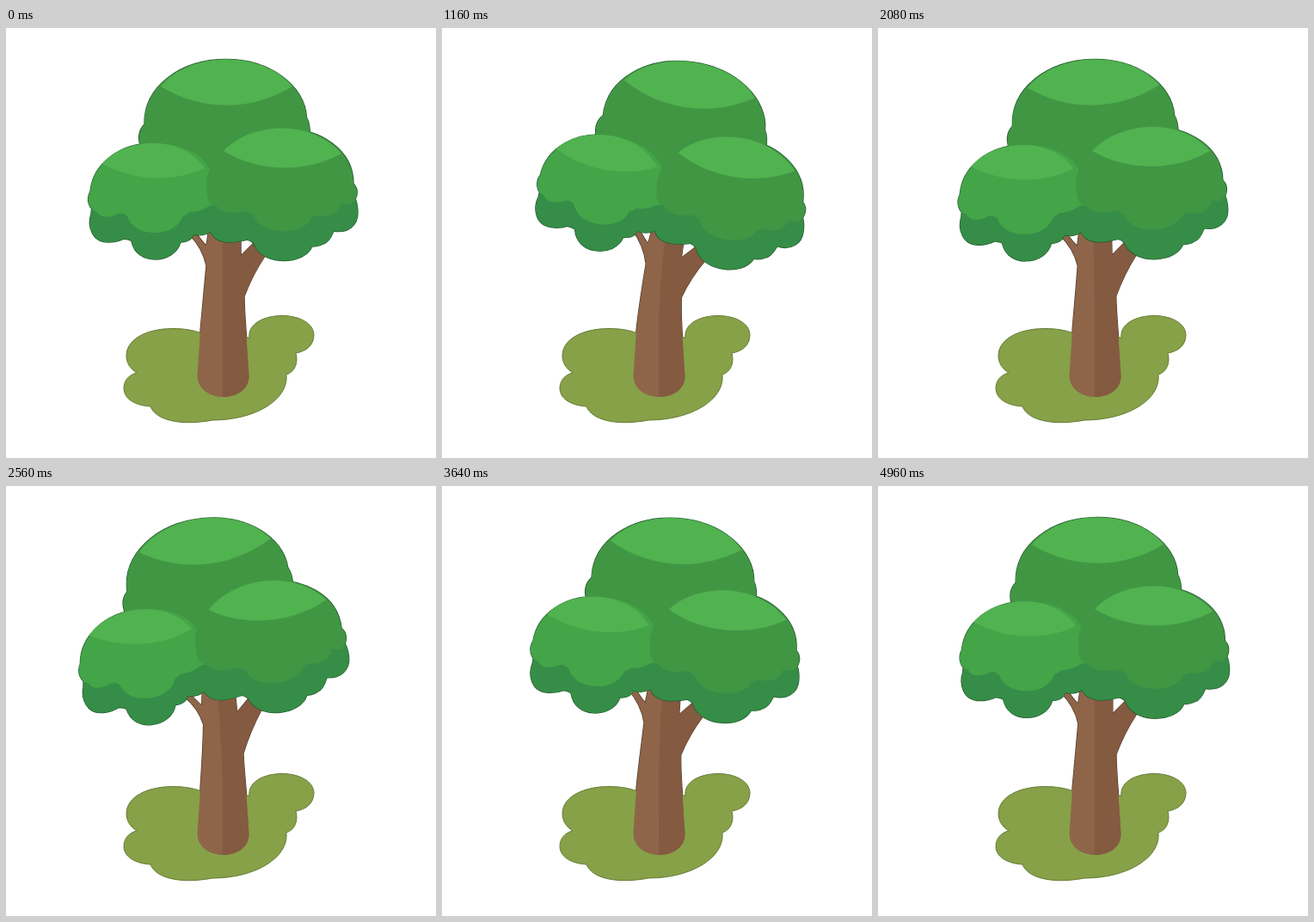
Write an HTML page that moves like this. It is 500 px wide and 500 px high and loops after 5000 ms.

```html
<!DOCTYPE html>
<html lang="en">
<head>
<meta charset="utf-8">
<title>Swaying tree</title>
<style>
  html, body { margin: 0; width: 100%; height: 100%; overflow: hidden; background: #fff; }
  svg { display: block; width: 100vw; height: 100vh; }
</style>
</head>
<body>
<svg viewBox="0 0 500 500">
  <g id="rim"></g>
  <path fill="#86a148" stroke="#667b35" stroke-width="1" d="M227,355 C218,351 206,349.500 194,349.500 C163,349.500 140,362 140,381 C140,389 144,396 152,401
    C143,403 137,410 137,419 C137,431 150,439 168,440 C174,456 203,463 240,456 C290,456 329,432 326,403
    C336,400 340,389 337,378 C349,376 358,369 358,357 C358,344 342,334.500 321,334.500 C300,334.500 281,344 283,360 Z"/>
  <g id="trunk"></g>
  <g id="crown" stroke-linejoin="round"></g>
</svg>
<script>
const LOOP = 5000, STEP = 40;
const rim = document.getElementById('rim');
const trunk = document.getElementById('trunk');
const crown = document.getElementById('crown');

// [time, lean]: the lean runs straight from knot to knot
const knots = [[0, 0], [920, 1.37], [2950, -1.36], [3950, 1.37], [5000, -0.09]];

const trunkRight = `C270,429 282.500,419 282.500,405
  L279,352 C278,338 277,325 277,312 C283,296 291,280 301,265 L301,245 L291,247
  L273,265 L273,222 Z`;
const trunkShape = `M235,222 L235,239 L233,253 C229,250 226,245 222,240 L213,240 C223,250 230,262 233,276
  C231,300 228,328 226,352 L222.500,404 C222.500,419 236,429 253,429 ${trunkRight}`;
const trunkShade = `M252,222 L252,265 C252,285 252,310 252,340 L252,429 ${trunkRight}`;

const dome = `M158,142 C153,130 154,119 161,112 C160,68 203,36.500 256,36.500
  C308,36.500 348,68 349.500,104 C352,108 353.500,115 353.500,125 L330,190 L180,190 Z`;
const skirt = `M100,205 L99,216 C95,228 98,249 119,249 C128,249 133,247 137,245 C142,246 145,246 146,248
  C149,262 160,269 173,269 C187,269 199,262 203,249 C213,249 217,244 218,240 C226,242 233,240 238,237
  C241,245 249,249 260,249 C270,249 277,247 281,246 C287,248 289,251 290,255
  C296,265 309,270.500 323,270.500 C338,270.500 351,265 356,254 C361,254 366,253 369,251
  C376,249 379,241 381,236 C398,239 409,229 409,215 C409,208 408,203 406,198 L330,170 L170,170 Z`;
const left = `M98,190 C101,158 132,134 171,134 C207,134 237,149 240,175 L250,206 C243,205 240,206 236,207
  C229,212 221,214 213,214 C210,217 208,218 206,218 C202,231 188,238 173,238 C157,238 145,231 141,219
  C136,214 132,215 128,217 C119,221 109,221 105,213 C96,211 93,199 98,190 Z`;
const right = `M238,162 C246,135 280,116.500 321,116.500 C366,116.500 404,142 404,181
  C411,188 409,200 400,205 C396,204 393,204 390,204 C388,214 379,220 367,218 C362,217 358,219 355,221
  C351,231 337,236 322,236 C306,236 293,230 288,218 C284,214 281,214 277,213
  C266,217 249,215 245,207 C236,206 233,196 234,188 C232,180 234,170 238,162 Z`;
const shines = `M180,68 C196,48 225,36.500 256,36.500 C288,36.500 317,48 333,68 C286,97 227,97 180,68 Z
  M112,158 C124,143 146,134 171,134 C197,134 219,145 231,163 C193,180 150,178 112,158 Z
  M253,143 C268,127 293,116.500 321,116.500 C349,116.500 374,128 390,146 C347,170 292,167 253,143 Z`;

function add(parent, d, attrs) {
  const p = document.createElementNS('http://www.w3.org/2000/svg', 'path');
  p.setAttribute('d', d);
  for (const k in attrs) p.setAttribute(k, attrs[k]);
  parent.appendChild(p);
  return p;
}

// The trunk's rim lies below the grass, so it shows only above it
const wood = [
  [rim, trunkShape, { fill: 'none', stroke: '#4d3426', 'stroke-width': 1.4 }],
  [trunk, trunkShape, { fill: '#8e6548' }],
  [trunk, trunkShade, { fill: '#845a41' }]
].map(([parent, d, attrs]) => ({ d, el: add(parent, d, attrs) }));

add(crown, dome + skirt + left + right, { fill: 'none', stroke: '#225a2d', 'stroke-width': 1.4 });
add(crown, dome, { fill: '#419643' });
add(crown, skirt, { fill: '#368d47' });
add(crown, left, { fill: '#44a448' });
add(crown, right, { fill: '#419643' });
add(crown, shines, { fill: '#51b250' });

function leanAt(t) {
  let i = 1;
  while (t > knots[i][0]) i++;
  const [t0, a] = knots[i - 1], [t1, b] = knots[i];
  return a + (b - a) * (t - t0) / (t1 - t0);
}

// The trunk bends progressively above its foot
function bend(d, s) {
  return d.replace(/([\d.]+),([\d.]+)/g, (m, px, py) => {
    const x = +px, y = +py, h = Math.max(0, (355 - y) / 115);
    const nx = x + s * 8 * h ** 1.85;
    const ny = y + s * 0.127 * (x - 252) * Math.min(1, h);
    return nx.toFixed(2) + ',' + ny.toFixed(2);
  });
}

function draw(t) {
  const s = leanAt(t);
  for (const w of wood) w.el.setAttribute('d', bend(w.d, s));
  const m = [1 - 0.006 * s * s, 0.127 * s, -0.125 * s, 1 - 0.009 * s * s, 0, 0];
  crown.setAttribute('transform', `translate(252 308) matrix(${m}) translate(-252 -308)`);
}

const start = performance.now();
function tick() {
  const t = (performance.now() - start) % LOOP;
  draw(Math.floor(t / STEP) * STEP);
  requestAnimationFrame(tick);
}
tick();
</script>
</body>
</html>
```
